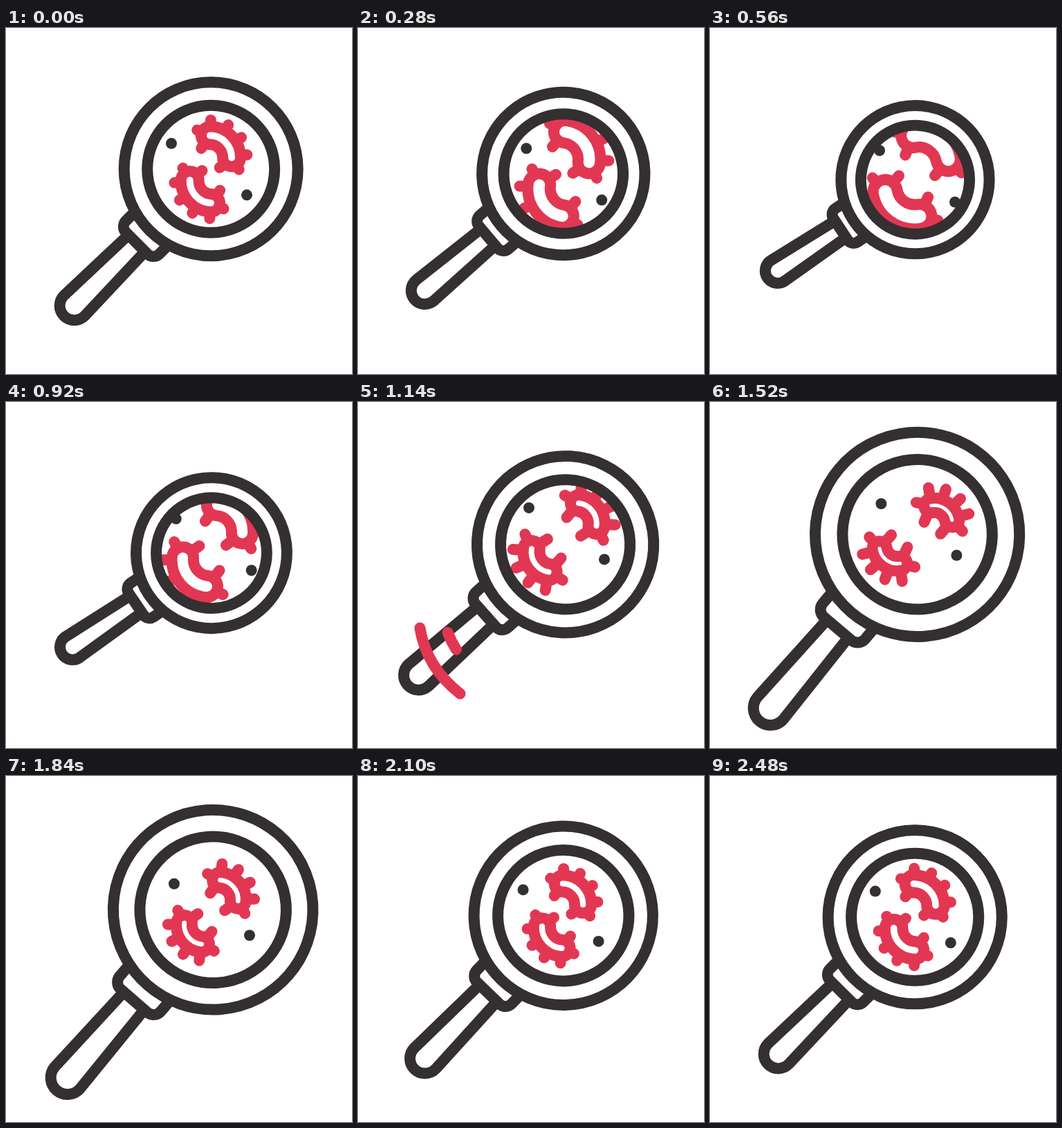
Animation of 500x500 px, one loop 2.5 s. Source, as an HTML page:

```html
<!DOCTYPE html>
<html lang="en">
<head>
<meta charset="utf-8">
<title>Magnifier over microbes</title>
<style>
html, body { margin: 0; width: 100%; height: 100%; overflow: hidden; background: #fff; }
svg { display: block; width: 100vw; height: 100vh; }
.ink { fill: none; stroke: #342f30; stroke-width: 16; }
.red { fill: none; stroke: #e23753; stroke-width: 16; stroke-linecap: round; stroke-linejoin: round; }
</style>
</head>
<body>
<svg viewBox="0 0 500 500">
  <defs><clipPath id="lens"><circle id="lensClip"/></clipPath></defs>
  <g clip-path="url(#lens)">
    <path id="germA" class="red"/>
    <path id="germB" class="red"/>
    <g id="dots" fill="#342f30">
      <circle r="8"/>
      <circle cx="109" cy="74.5" r="8"/>
    </g>
  </g>
  <g id="glass" class="ink">
    <circle cx="65.3" r="125.5"/>
    <circle cx="65.3" r="92"/>
    <path d="M-55.5-34H-74.3A12 12 0 0 0-86.3-22V22A12 12 0 0 0-74.3 34H-55.5"/>
    <path d="M-86.3-17L-214-21A21 21 0 0 0-214 21L-86.3 17"/>
  </g>
  <path id="longStreak" class="red" pathLength="1" d="M89.5 326.5Q98.5 383 147.5 421.5"/>
  <path id="shortStreak" class="red" pathLength="1" d="M129.5 333Q135 347 142.5 358.5"/>
</svg>
<script>
const LOOP = 2500, PART = LOOP / 3;
const el = id => document.getElementById(id);
const clamp = x => Math.max(0, Math.min(1, x));

// Symmetric cubic Bezier ease with handles at a and 1 - a
function ease(x, a) {
  let lo = 0, hi = 1;
  for (let i = 0; i < 24; i++) {
    const m = (lo + hi) / 2, n = 1 - m;
    if (3 * n * n * m * a + 3 * n * m * m * (1 - a) + m * m * m < x) lo = m;
    else hi = m;
  }
  return lo * lo * (3 - 2 * lo);
}

// Returns a mixer over three cyclic key poses
function poser(t, lead, a) {
  const u = ((t + lead) % LOOP) / PART, i = Math.floor(u) % 3, y = ease(u % 1, a);
  return (...k) => k[i] + (k[(i + 1) % 3] - k[i]) * y;
}

const polar = (x, y, deg, r) => {
  const a = deg * Math.PI / 180;
  return `${(x + r * Math.cos(a)).toFixed(2)} ${(y + r * Math.sin(a)).toFixed(2)}`;
};

// Bent capsule with spokes; g scales the body, len is the spoke length
function germPath(g, len) {
  const h = 16 * g, out = 45 * g, inn = 19 * g, cap = 13 * g;
  const at = (deg, r) => polar(-h, h, deg, r);
  const spoke = (x, y, deg, r, l) => `M${polar(x, y, deg, r)}L${polar(x, y, deg, r + l)}`;
  let d = `M${at(-90, out)}A${out} ${out} 0 0 1 ${at(0, out)}` +
    `A${cap} ${cap} 0 0 1 ${at(0, inn)}A${inn} ${inn} 0 0 0 ${at(-90, inn)}` +
    `A${cap} ${cap} 0 0 1 ${at(-90, out)}Z`;
  for (const a of [-89, -61, -33, -5]) d += spoke(-h, h, a, out, len);
  d += spoke(h, h, 57, cap, len * 0.75) + spoke(h, h, 140, cap, len);
  d += spoke(-h, -h, 123, cap, len) + spoke(-h, -h, 202, cap, len * 0.75);
  return d;
}

function place(id, x, y, deg) {
  el(id).setAttribute('transform', `translate(${x} ${y}) rotate(${deg})`);
}

function streak(id, t, from, to) {
  const head = clamp((t - from) / 110), tail = clamp((t - to) / 140);
  const node = el(id);
  node.style.display = head > 0 && tail < 1 ? '' : 'none';
  node.setAttribute('stroke-dasharray', `${Math.max(head - tail, 0.001)} 3`);
  node.setAttribute('stroke-dashoffset', -tail);
}

function draw(t) {
  const glass = poser(t, 113, 0.67);
  const s = glass(1.0025, 0.848, 1.177), tilt = glass(45.2, 33.1, 49.8);
  el('glass').setAttribute('transform', `translate(250 250) rotate(${-tilt}) scale(${s})`);
  el('glass').style.strokeWidth = 16 / s;

  const a = tilt * Math.PI / 180, clip = el('lensClip');
  clip.setAttribute('cx', 250 + 65.3 * s * Math.cos(a));
  clip.setAttribute('cy', 250 - 65.3 * s * Math.sin(a));
  clip.setAttribute('r', 92 * s);

  const germ = poser(t, 236.7, 0.55), w = 2 * Math.PI / PART;
  const spin = -9 * Math.cos(w * (t - 640)) - 3 * Math.cos(2 * w * (t - 185));
  const d = germPath(germ(0.944, 1.35, 0.81), germ(8.9, 13, 15.5));
  el('germA').setAttribute('d', d);
  el('germB').setAttribute('d', d);
  place('germA', germ(309.1, 319, 335), germ(171.3, 172.5, 160), spin - 1);
  place('germB', germ(281.4, 278, 259.5), germ(233.7, 254.5, 222.3), spin + 180.5);
  place('dots', germ(238.1, 245, 247.5), germ(165.4, 177, 146.7), 0);

  streak('longStreak', t, 1025, 1150);
  streak('shortStreak', t, 1035, 1145);
}

const start = performance.now();
function tick() {
  draw((performance.now() - start) % LOOP);
  requestAnimationFrame(tick);
}
tick();
</script>
</body>
</html>
```
